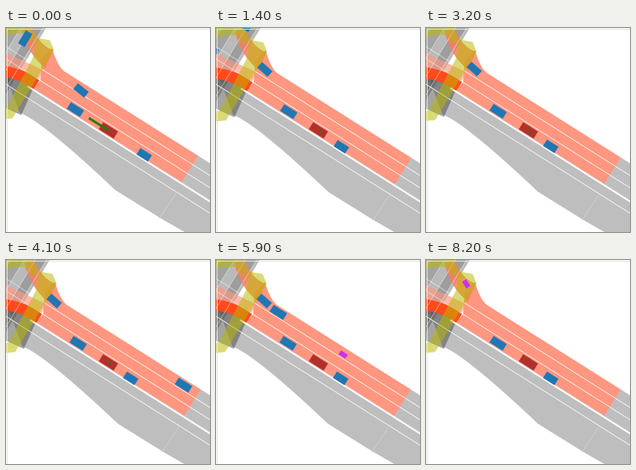
These frames come from a looping animation (256 px wide and 256 px high, 8300 ms). A matplotlib script:

```python
import numpy as np
import matplotlib.pyplot as plt
from matplotlib.animation import FuncAnimation
from matplotlib.patches import Polygon
from matplotlib.transforms import Affine2D

SIZE, FRAMES, STEP = 256, 83, 100
PX = 0.72  # points per pixel at 100 dpi

ALONG = np.array([0.845, 0.534])     # road direction, pointing down right
ACROSS = np.array([-0.534, 0.845])
UP = np.array([0.52, -0.854])        # direction of the crossing road
CORNER = np.array([244.0, 162.0])    # upper right corner of the lit road
EGO = np.array([128.0, 128.0])
LANE = 13

GREY, DARK = "#bebebe", "#4a4a4a"
SALMON, RED = "#ff967f", "#ff4a1c"
YELLOW, BLUE = "#b9b900", "#1f77b4"
CRIMSON, MAGENTA, GREEN = "#b2302a", "#cc2ff5", "#2a7a0c"

fig = plt.figure(figsize=(2.56, 2.56), dpi=100, facecolor="white")
ax = fig.add_axes([0, 0, 1, 1])
ax.set_xlim(-0.5, SIZE - 0.5)
ax.set_ylim(SIZE - 0.5, -0.5)
ax.axis("off")
shift = Affine2D()
on_map = shift + ax.transData


def area(points, color, alpha=1.0, z=1):
    ax.add_patch(Polygon(points, facecolor=color, edgecolor="none",
                         alpha=alpha, zorder=z, transform=on_map))


def line(points, width=0.8, color="white", alpha=1.0, z=4):
    x, y = np.transpose(points)
    ax.plot(x, y, color=color, lw=width * PX, alpha=alpha, zorder=z,
            transform=on_map, solid_capstyle="butt")


def bezier(a, b, c, t):
    a, b, c = map(np.array, (a, b, c))
    return (1 - t) ** 2 * a + 2 * t * (1 - t) * b + t ** 2 * c


def curve(a, b, c):
    return bezier(a, b, c, np.linspace(0, 1, 24)[:, None])


def on_road(across, x):
    """Point at a given x on the line parallel to the road's upper edge."""
    start = CORNER + ACROSS * across
    return start + ALONG * (x - start[0]) / ALONG[0]


def crossing(x, length=130):
    """Line of the crossing road that meets the top of the stage at x."""
    top = np.array([x, 0]) + UP * 20
    return [top, top - UP * length]


def strip(left, right, **style):
    area([*crossing(left), *crossing(right)[::-1]], DARK, **style)


def draw_road():
    edge = curve((20, 108), (48, 118), (140, 205))
    area([on_road(39, 0), on_road(39, 280), (280, 288), (198, 241),
          *edge[::-1]], GREY)
    area([CORNER, on_road(0, 280), on_road(39, 280), on_road(39, 220)], GREY)

    bend = curve((76, 56), (67, 49), (61, 27))
    area([CORNER, *bend, (48, 40), on_road(26, 46), on_road(39, 37),
          CORNER + ACROSS * 39], SALMON, z=2)

    for n in (1, 2):
        line([on_road(n * LANE, 42), on_road(n * LANE, 280)])
        line([on_road(n * LANE, -20), on_road(n * LANE, 42)], alpha=0.6)
    line([on_road(40.6, 30), on_road(40.6, 280)], 2)
    line([on_road(4 * LANE + 1, -20), on_road(4 * LANE + 1, 280)])
    line([(217, 208), (195, 241)], color="#d2d2d2")


def draw_junction():
    strip(-30, 54, alpha=0.38)
    strip(6, 22, alpha=0.2)
    strip(36, 50, alpha=0.25)
    area([on_road(39, -20), on_road(39, 37), (22, 111), (-20, 92)],
         DARK, 0.5)

    # right turn, straight on and left turn of the lit lanes
    area([*curve((62, 29), (46, 25), (35, 0)),
          *curve((23, 3), (27, 30), (52, 52))], "#f5805f", 0.85, z=2)
    area([on_road(LANE, 50), on_road(26, 44), (-20, 40), (-20, 22)],
         SALMON, 0.65, z=2)
    area([*curve((45, 67), (20, 48), (-20, 47)),
          *curve((-20, 62), (14, 60), (37, 79))], RED, z=3)

    for x in (22, 36, 50):
        line(crossing(x), alpha=0.5)

    # stop zones
    area([(41, 14), (58, 17), (63, 29), (56, 41), (11, 115), (-20, 118),
          (-20, 106), (3, 103), (37, 38)], YELLOW, 0.52, z=5)
    area([(-20, 10), (8, -10), (30, -10), (41, 14), (34, 20), (24, 8),
          (-20, 12)], YELLOW, 0.5, z=5)


def ease_out(t, duration):
    """Distance share still to go while braking to a stop."""
    return max(0, 1 - t / duration) ** 2


# Each path gives a position at t seconds.

def parked(x, y):
    return lambda t: np.array([x, y])


def braking(x, y, heading, distance, duration):
    return lambda t: (np.array([x, y])
                      + heading * distance * ease_out(t, duration))


def steady(x, y, heading, speed, when):
    """Constant speed, passing (x, y) at the given moment."""
    return lambda t: np.array([x, y]) + heading * speed * (t - when)


def right_turner(t):
    stop = (60, 51)
    if t < 6.2:
        return braking(*stop, np.array([0.787, 0.617]), 47, 1.2)(t)
    return bezier(stop, (44, 36), (28, -12), ((t - 6.2) / 1.9) ** 2)


def cyclist(t):
    bend = (87, 71.5)
    if t < 7:
        return steady(*bend, -np.array([0.84, 0.543]), 78, 7)(t)
    return bezier(bend, (66, 55), (50, 29.5), (t - 7) / 1.2)


class Mover:
    """Box on a path, turned to the way it moves."""

    def __init__(self, length, width, color, path, heading=ALONG,
                 transform=on_map):
        self.corners = np.array([(-1, -1), (1, -1), (1, 1), (-1, 1)]) \
            * (length / 2, width / 2)
        self.path, self.rest = path, heading
        self.patch = ax.add_patch(Polygon(
            self.corners, facecolor=color, edgecolor="none", zorder=7,
            transform=transform))

    def place(self, t):
        place = self.path(t)
        way = self.path(t + 0.01) - place
        speed = np.hypot(*way)
        c, s = way / speed if speed > 1e-3 else self.rest
        self.patch.set_xy(self.corners @ np.array([(c, s), (-s, c)]) + place)


draw_road()
draw_junction()
movers = [
    Mover(19.5, 9.8, BLUE, parked(90, 104)),
    Mover(17, 9.5, BLUE, braking(156, 148, ALONG, 24, 1)),
    Mover(17.5, 9.3, BLUE, right_turner, np.array([0.743, 0.669])),
    Mover(19, 9.5, BLUE, steady(27, 15, UP, 18, 0)),
    Mover(19, 6.5, BLUE, steady(9, 9, UP, -40, 0.7)),
    Mover(20, 9.8, BLUE, steady(158, 116, -ALONG, 95, 4.9)),
    Mover(15, 8, BLUE, steady(17, 31, UP, 65, 4.9)),
    Mover(10, 6, MAGENTA, cyclist),
    Mover(22, 10.5, CRIMSON, parked(*EGO), transform=ax.transData),
]
arrow, = ax.plot([], [], color=GREEN, lw=3 * PX, zorder=8,
                 solid_capstyle="butt")
dot, = ax.plot([129], [129], "o", color=GREEN, ms=3 * PX, mew=0, zorder=8)
ax.plot([0, 255, 255, 0, 0], [0, 0, 255, 255, 0], color="#e4e4e4", lw=PX,
        zorder=9)


def travel(t):
    """Braking, then a slow roll back to rest."""
    if t < 0.6:
        return -4 + 29 * t - 24 * t * t
    return 4.76 * np.exp(-(t - 0.6) / 0.5)


def update(i):
    t = i * STEP / 1000
    shift.clear().translate(*(ALONG * travel(t)))
    for mover in movers:
        mover.place(t)
    tip = EGO - ALONG * max(0, 29 - 48 * t)
    arrow.set_data(*np.transpose([EGO, tip]))
    dot.set_visible(0.6 <= t < 4.2 or 6 <= t < 7.6)
    return []


anim = FuncAnimation(fig, update, frames=FRAMES, interval=STEP, repeat=True,
                     repeat_delay=0, blit=False)
plt.show()
```
